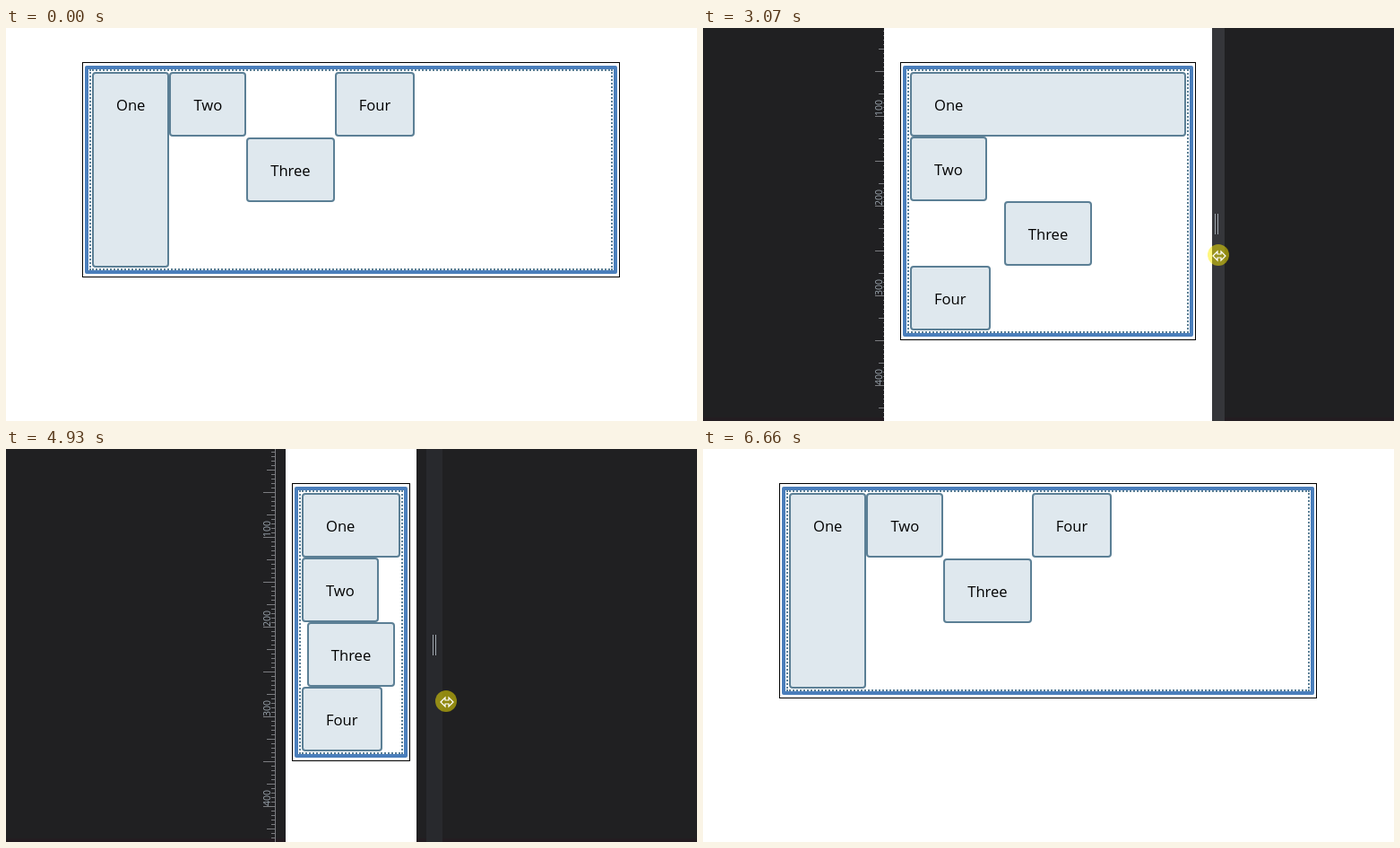
An HTML page that plays this animation: 771x438 px, repeating every 7190 ms.

```html
<!DOCTYPE html>
<html lang="en">
<head>
<meta charset="utf-8">
<title>Responsive flex demo</title>
<style>
  html, body { margin: 0; width: 100%; height: 100%; overflow: hidden; }
  #stage {
    position: relative; width: 771px; height: 438px; overflow: hidden;
    background: linear-gradient(#202022 434px, #231c21 434px);
  }
  #stage > * { position: absolute; top: 0; left: 0; }
  #ruler { overflow: visible; }
  #ruler path { stroke: #7b7c80; fill: none; }
  #ruler text { font: 10.5px "Open Sans", sans-serif; fill: #9ba5af; }
  #handle { width: 18px; height: 438px; background: #35363a; }
  #handle.idle { background: #28292d; }
  #handle::after {
    content: ""; position: absolute; left: 7px; top: 207px;
    width: 2px; height: 23px; border: solid #9fa6ad; border-width: 0 1.5px;
  }
  #page { height: 438px; background: #fff; }
  #box {
    top: 38px !important; height: 240px; box-sizing: border-box;
    display: flex; align-items: flex-start;
    padding: 10px; border: 1px solid #000;
  }
  #box::before, #box::after { content: ""; position: absolute; z-index: 1; }
  #box::before { inset: 3px 2px; border: 4px solid #4a7ebb; border-radius: 2px; }
  #box::after { inset: 7px; border: 2px dotted #5b7f95; }
  #box div {
    flex: none; box-sizing: border-box; min-height: 72px;
    padding: 23px 25px 21px; border: 2px solid #5b7f95; border-radius: 4px;
    background: #dfe8ee; color: #000;
    font: 16.6px/24px "Open Sans", sans-serif; white-space: nowrap;
  }
  #box .stretch { align-self: stretch; }
  #box .center { align-self: center; }
  #box.narrow { flex-direction: column; height: 310px; }
  #cursor { overflow: visible; }
  #cursor circle { fill: rgba(255, 240, 0, .5); }
  #cursor path { fill: none; stroke: #fff; stroke-width: 1.2; }
</style>
</head>
<body>
<div id="stage">
  <svg id="ruler" width="1" height="438"></svg>
  <div id="handle"></div>
  <div id="page"></div>
  <div id="box">
    <div class="stretch">One</div>
    <div>Two</div>
    <div class="center">Three</div>
    <div>Four</div>
  </div>
  <svg id="cursor" width="1" height="1">
    <circle r="12"/>
    <path id="arrows" d="M-6 1l5-5v3h4v-3l5 5-5 5v-3h-4v3z"/>
  </svg>
</div>
<script>
const LOOP = 7190, STEP = 66, MID = 385, BREAKPOINT = 480;
const $ = id => document.getElementById(id);
const mix = (a, b, f) => a + (b - a) * f;
const linear = f => f;

// Each drag: where the ruler edge and the cursor end up; lag is how far the page trails.
const drags = [
  { at: 2130, steps: 11, edge: 166, x: 612, y: 244, ease: linear, lag: 0 },
  { at: 2860, steps: 11, edge: 275, x: 511, y: 268, ease: linear, lag: -4 },
  { at: 3610, steps: 11, edge: 358, x: 429, y: 280, ease: linear, lag: 0 },
  { at: 4670, steps: 11, edge: 193, x: 606, y: 284, ease: f => f ** 1.34, lag: 11 },
  { at: 5400, steps: 10, edge: 0, x: 806, y: 299, ease: f => 1 - (1 - f) ** 1.32, lag: 0 }
];

function buildRuler() {
  let ticks = 'M-.5 0V438', labels = '';
  for (let n = 5; n < 440; n += 5) {
    const y = n - 2, len = n % 50 === 0 ? 14 : n % 25 === 0 ? 10 : 5;
    ticks += `M0 ${y + .5}h${-len}`;
    if (n % 100 === 0) labels += `<text transform="translate(-6 ${y}) rotate(-90)">${n}</text>`;
  }
  $('ruler').innerHTML = `<path d="${ticks}"/>${labels}`;
}

function dragState(t) {
  let s = { edge: 0, x: 783, y: 221, lag: 0 };
  for (const d of drags) {
    if (t < d.at) break;
    const k = Math.min(d.steps, Math.floor((t - d.at + 5) / STEP) + 1);
    const f = d.ease(k / d.steps);
    s = {
      edge: Math.round(mix(s.edge, d.edge, f)),
      x: mix(s.x, d.x, f),
      y: mix(s.y, d.y, f),
      lag: k < d.steps ? d.lag : 0
    };
  }
  return s;
}

// The pointer also crosses the corner of the page before and after the drags.
function pointer(t, s) {
  if (t >= 1130 && t < 1460) {
    const f = Math.min(4, Math.floor((t - 1125) / STEP)) / 4;
    return [691 + 63 * f ** 1.5, 422 - 119 * f, false];
  }
  if (t >= 6600 && t < 6660) return [746, 382, false];
  return t >= 2130 && t < 6000 ? [s.x, s.y, true] : null;
}

const move = (id, x, y = 0) => $(id).style.transform = `translate(${x}px, ${y}px)`;

function draw(t) {
  const s = dragState(t);
  const left = s.edge + s.lag;
  const width = s.edge ? 2 * (MID - left) : 771;
  const half = Math.min(300, Math.round(width * .45));

  move('ruler', s.edge);
  move('handle', 2 * MID - s.edge);
  $('handle').classList.toggle('idle', t >= 4670);
  move('page', left);
  $('page').style.width = width + 'px';
  move('box', MID - half);
  $('box').style.width = 2 * half + 'px';
  $('box').classList.toggle('narrow', width < BREAKPOINT);

  const p = pointer(t, s);
  $('cursor').style.display = p ? '' : 'none';
  if (p) {
    move('cursor', Math.round(p[0]), Math.round(p[1]));
    $('arrows').style.display = p[2] ? '' : 'none';
  }
}

buildRuler();
const begin = performance.now();
function tick() {
  draw((performance.now() - begin) % LOOP);
  requestAnimationFrame(tick);
}
tick();
</script>
</body>
</html>
```
